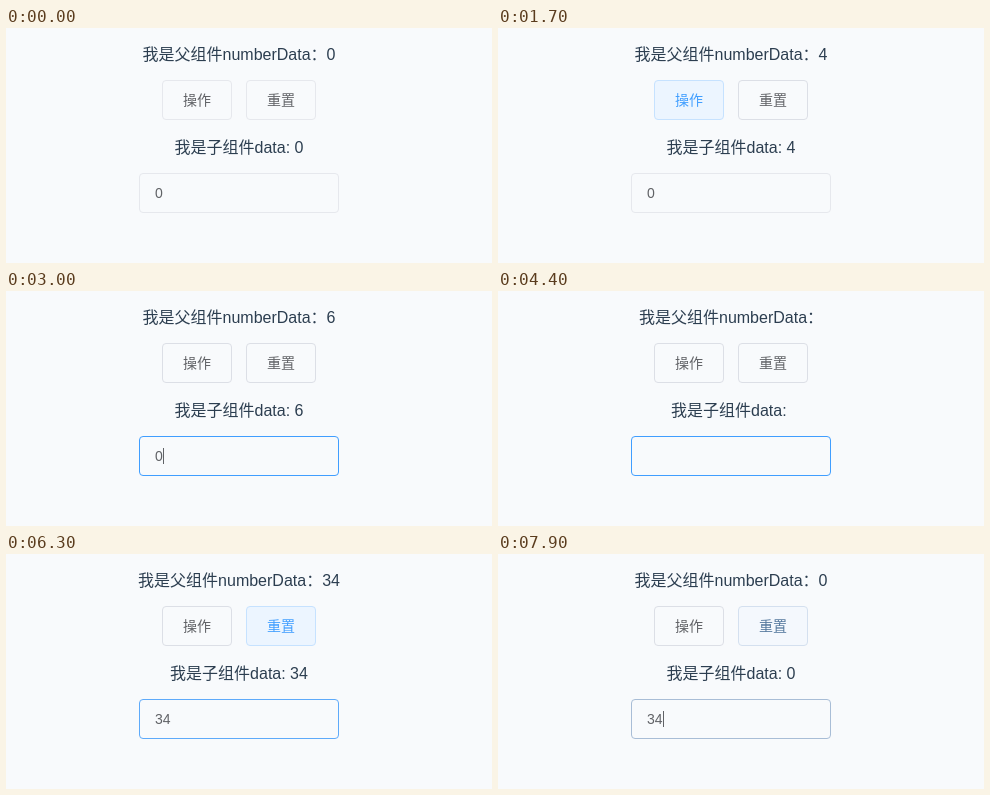
An HTML page with a canvas that plays this animation: 486x235 px, repeating every 8 s.

```html
<!DOCTYPE html>
<html lang="zh-CN">
<head>
<meta charset="utf-8">
<title>父子组件</title>
<style>
  html, body { margin: 0; width: 100%; height: 100%; overflow: hidden; background: #f8fafc; }
  canvas { display: block; }
</style>
</head>
<body>
<canvas id="stage" width="486" height="235"></canvas>
<script>
const ctx = document.getElementById('stage').getContext('2d');
const LOOP = 8000, STEP = 100, FADE = 100;
const PAGE = '#f8fafc', INK = '#606266';
const FONT = '"Liberation Sans", Arial, "Noto Sans CJK SC", "Noto Sans CJK", sans-serif';

const looks = {
  pale: { fill: PAGE, line: '#e6e8ed', text: INK },
  idle: { fill: PAGE, line: '#dcdfe6', text: INK },
  hover: { fill: '#ecf5ff', line: '#c6e2ff', text: '#409eff' },
  active: { fill: '#ecf5ff', line: '#3a8ee6', text: '#3a8ee6' },
  fieldHover: { fill: PAGE, line: '#c0c4cc', text: INK },
  fieldFocus: { fill: PAGE, line: '#409eff', text: INK }
};

// Six quick clicks; each release raises the counter.
const releases = Array.from({ length: 6 }, (_, i) => 870 + 240 * i);
const actTrack = [
  [0, 'pale'], [370, 'hover'],
  ...releases.flatMap(t => [[t - 120, 'active'], [t, 'hover']]),
  [2880, 'idle']
];
const resetTrack = [
  [0, 'pale'], [260, 'hover'], [360, 'idle'],
  [6180, 'hover'], [6310, 'active'], [6690, 'hover'], [7860, 'idle']
];
const fieldTrack = [
  [0, 'pale'], [2640, 'fieldHover'], [2880, 'fieldFocus'],
  [6290, 'idle'], [7340, 'fieldHover'], [7890, 'fieldFocus']
];
const typed = [[0, '0'], [4000, ''], [4500, '3'], [5200, '34']];
const caretSpans = [[2900, 3400], [3900, 4400], [4500, 5000], [5200, 5700], [6200, 6300], [7900, 8000]];

const lastIndex = (track, t) => track.findLastIndex(([start]) => start <= t);

function mix(a, b, k) {
  const channel = (hex, i) => parseInt(hex.slice(i, i + 2), 16);
  const parts = [1, 3, 5].map(i => Math.round(channel(a, i) + (channel(b, i) - channel(a, i)) * k));
  return `rgb(${parts})`;
}

function lookAt(track, t) {
  const i = lastIndex(track, t);
  const to = looks[track[i][1]];
  const from = i ? looks[track[i - 1][1]] : to;
  const p = Math.min(1, (t - track[i][0]) / FADE);
  const k = 1 - (1 - p) ** 2;
  return {
    fill: mix(from.fill, to.fill, k),
    line: mix(from.line, to.line, k),
    text: mix(from.text, to.text, k)
  };
}

function box(x, y, w, h, look) {
  ctx.beginPath();
  ctx.roundRect(x + 0.5, y + 0.5, w - 1, h - 1, 3.5);
  ctx.fillStyle = look.fill;
  ctx.fill();
  ctx.strokeStyle = look.line;
  ctx.stroke();
}

function label(text, x, y, size, color, align = 'center') {
  ctx.font = `${size}px ${FONT}`;
  ctx.textAlign = align;
  ctx.fillStyle = color;
  ctx.fillText(text, x, y);
}

function button(text, x, look) {
  box(x, 52, 70, 40, look);
  label(text, x + 35, 77, 14, look.text);
}

function field(text, t) {
  box(133, 145, 200, 40, lookAt(fieldTrack, t));
  label(text, 149, 170, 14, INK, 'left');
  if (caretSpans.some(([on, off]) => t >= on && t < off)) {
    ctx.fillRect(149 + Math.round(ctx.measureText(text).width), 157, 1, 16);
  }
}

function draw(t) {
  const input = typed[lastIndex(typed, t)][1];
  const clicks = releases.filter(r => r <= t).length;
  const value = t < 4000 ? clicks : t < 6700 ? input : 0;

  ctx.fillStyle = PAGE;
  ctx.fillRect(0, 0, 486, 235);
  label(`我是父组件numberData：${value}`, 233, 32, 16, '#2c3e50');
  button('操作', 156, lookAt(actTrack, t));
  button('重置', 240, lookAt(resetTrack, t));
  label(`我是子组件data: ${value}`, 233, 125, 16, '#2c3e50');
  field(input, t);
}

const begin = performance.now();
function tick() {
  const t = (performance.now() - begin) % LOOP;
  draw(Math.floor(t / STEP) * STEP);
  requestAnimationFrame(tick);
}
tick();
</script>
</body>
</html>
```
